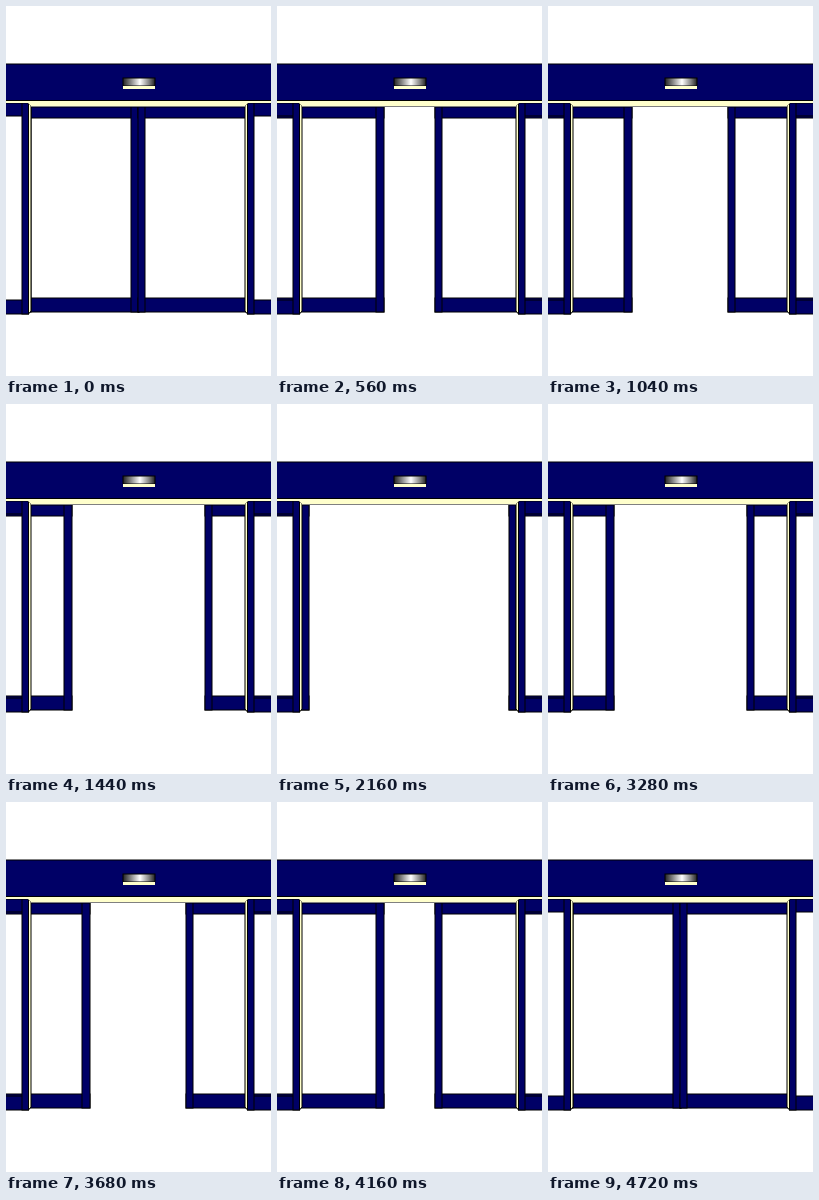
An HTML page with a canvas that plays this animation: 265x370 px, repeating every 4800 ms.

```html
<!DOCTYPE html>
<html lang="en">
<head>
<meta charset="utf-8">
<title>Sliding doors</title>
<style>
  html, body { margin: 0; width: 100%; height: 100%; overflow: hidden; background: #fff; }
  canvas { display: block; }
</style>
</head>
<body>
<canvas id="stage" width="265" height="370"></canvas>
<script>
const ctx = document.getElementById('stage').getContext('2d');
const NAVY = '#000066', CREAM = '#ffffcc', BLACK = '#000', GREY = '#808080';
const STEP_MS = 80, STEPS = 60;
const LEFT_SPEED = 3.74, RIGHT_SPEED = 3.7;

function fill(color, x, y, w, h) {
  ctx.fillStyle = color;
  ctx.fillRect(x, y, w, h);
}

// Outlines sit on pixel boundaries, which gives them a soft outer edge.
function beam(left, top, right, bottom, color = NAVY) {
  fill(color, left, top, right - left, bottom - top);
  ctx.strokeStyle = BLACK;
  ctx.strokeRect(left, top, right - left, bottom - top);
}

function door(left, right, leftStile, rightStile) {
  beam(left, 101, right, 112);
  beam(left, 292, right, 306);
  beam(left, 101, left + leftStile, 306);
  beam(right - rightStile, 101, right, 306);
}

function sidePanel(left, right, stileLeft, stileRight) {
  beam(left, 97, right, 110);
  beam(left, 294, right, 308);
  beam(stileLeft, 97, stileRight, 308);
}

function jamb(outer, inner) {
  ctx.beginPath();
  ctx.moveTo(outer, 97);
  ctx.lineTo(inner, 100);
  ctx.lineTo(inner, 305);
  ctx.lineTo(outer, 308);
  ctx.closePath();
  ctx.fillStyle = CREAM;
  ctx.fill();
  ctx.strokeStyle = BLACK;
  ctx.stroke();
}

function header() {
  beam(-2, 58, 267, 95);
  fill(BLACK, 0, 94, 265, 1);
  fill(CREAM, 0, 95, 265, 2);
  ctx.beginPath();
  ctx.moveTo(22, 97);
  ctx.lineTo(25, 100);
  ctx.lineTo(239, 100);
  ctx.lineTo(242, 97);
  ctx.fill();
  fill(GREY, 25, 100, 214, 1);
}

function sensor() {
  const shine = ctx.createLinearGradient(117, 0, 149, 0);
  shine.addColorStop(0, '#222');
  shine.addColorStop(0.25, '#888');
  shine.addColorStop(0.53, '#fff');
  shine.addColorStop(0.8, '#888');
  shine.addColorStop(1, '#222');
  beam(117, 72, 149, 80, shine);
  fill(CREAM, 117, 80, 32, 3);
}

function draw(step) {
  // Doors open for half the loop, then retrace the same positions.
  const travel = Math.min(step, STEPS - 1 - step);
  const left = Math.round(travel * LEFT_SPEED);
  const right = Math.round(travel * RIGHT_SPEED);
  fill('#fff', 0, 0, 265, 370);
  door(18 - left, 133 - left, 7, 8);
  door(132 + right, 247 + right, 7, 7);
  sidePanel(-2, 22.5, 16, 22.5);
  sidePanel(241.5, 267, 241.5, 248);
  jamb(22.5, 25);
  jamb(241.5, 239);
  header();
  sensor();
}

function tick() {
  draw(Math.floor(performance.now() / STEP_MS) % STEPS);
  requestAnimationFrame(tick);
}
tick();
</script>
</body>
</html>
```
